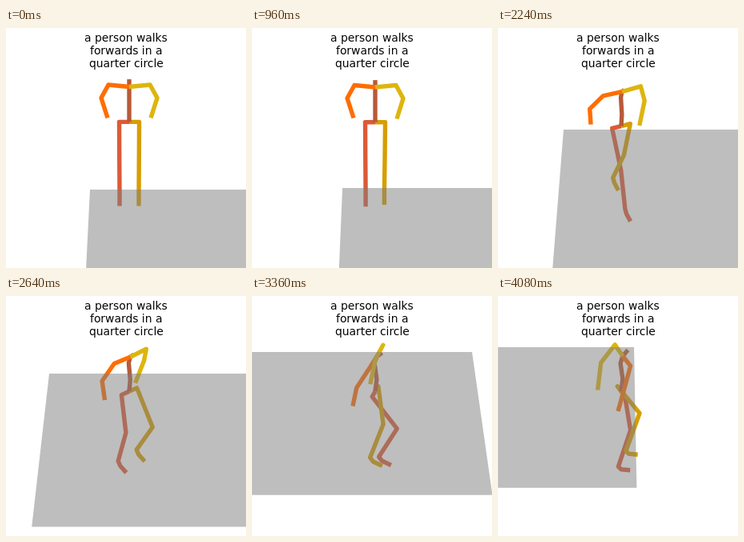
Recreate the animation shown at these times as an HTML page with a canvas. Size 300x300 px, loop 4160 ms.

```html
<!DOCTYPE html>
<html lang="en">
<head>
<meta charset="utf-8">
<title>Walking figure</title>
<style>
html, body { margin: 0; width: 100%; height: 100%; overflow: hidden; background: #fff; }
canvas { display: block; }
</style>
</head>
<body>
<canvas id="stage" width="300" height="300"></canvas>
<script>
const ctx = document.getElementById('stage').getContext('2d');
const LOOP = 4160, STEP = 80;
const TITLE = ['a person walks', 'forwards in a', 'quarter circle'];
const LEFT = 1, RIGHT = -1;

// Ground: a square seen in perspective; scale grows linearly below the horizon.
const CENTER = 154, HORIZON = -780, WIDTH = 0.356, DEPTH = 0.0002043;

// Body, in pixels: camera tilt, floor line at ankle height, limb sizes.
const TILT_Z = 0.55, TILT_H = 0.86, FLOOR = 206;
const BONE = 52, REACH = 103, HIP = 12.5, SHOULDER = 26;
const CYCLE = 1440, CONTACT = 1514, STRIDE = 42;

// Walked path: time, left edge of the ground, screen y of its far edge.
const path = [
  [0, -0.0499, 202],
  [960, -0.0418, 200],
  [1600, -0.0374, 182],
  [2240, -0.0794, 127],
  [2640, -0.114, 97],
  [3360, -0.2136, 70],
  [4080, -0.337, 64]
];

const ramp = (t, from, span) => Math.min(1, Math.max(0, (t - from) / span));

// Smooth interpolation that does not overshoot at turning points.
function along(t, c) {
  const last = path.length - 1;
  const slope = k => (path[k + 1][c] - path[k][c]) / (path[k + 1][0] - path[k][0]);
  const tangent = k => {
    if (k === 0) return slope(0);
    if (k === last) return slope(last - 1);
    const a = slope(k - 1), b = slope(k);
    return a * b <= 0 ? 0 : 2 * a * b / (a + b);
  };
  let i = 0;
  while (i < last - 1 && t >= path[i + 1][0]) i++;
  const span = path[i + 1][0] - path[i][0], u = ramp(t, path[i][0], span);
  const p = path[i][c], d = path[i + 1][c] - p;
  const m = tangent(i) * span, n = tangent(i + 1) * span;
  return p + u * (m + u * (3 * d - 2 * m - n + u * (m + n - 2 * d)));
}

// Everything the pose needs at one moment.
function gait(t) {
  const walk = ramp(t, 900, 700);
  const turn = Math.pow(ramp(t, 1000, 3080), 1.65);
  const phase = 2 * Math.PI * (t - CONTACT) / CYCLE;
  const reach = Math.cos(phase);
  return {
    walk, turn, phase,
    facing: turn * 112 * Math.PI / 180,
    stride: STRIDE * ramp(t, 900, 1600),
    hips: 103 - walk * (2 + 4 * reach * reach)
  };
}

// Points are [forward, left, up] relative to the spot below the pelvis.
const add = (a, b) => a.map((v, i) => v + b[i]);

function leg(side, g) {
  const swing = side * Math.cos(g.phase), speed = -side * Math.sin(g.phase);
  const hip = [0, side * HIP, g.hips];
  const lift = g.walk * 24 * (1 - 0.6 * g.turn) * Math.max(0, speed) ** 2;
  let df = g.stride * swing, dh = lift - g.hips;
  const far = Math.hypot(df, dh), dist = Math.min(far, REACH);
  df *= dist / far;
  dh *= dist / far;
  const bend = Math.sqrt(BONE * BONE - dist * dist / 4);
  const ankleSide = side * (12 - 4 * g.walk) - 3 * g.walk;
  const ankle = [df, ankleSide, g.hips + dh];
  const knee = [
    df / 2 - bend * dh / dist,
    (hip[1] + ankleSide) / 2,
    g.hips + dh / 2 + bend * df / dist
  ];
  return [[0, 0, g.hips], hip, knee, ankle, add(ankle, [4, 0, -5]), add(ankle, [16, 0, -9])];
}

function torso(g) {
  const pelvis = [0, 0, g.hips];
  const neck = add(pelvis, [2 * g.walk, 0, 51]);
  return [
    pelvis,
    add(pelvis, [2, 0, 18]),
    add(pelvis, [-1, 0, 41]),
    neck,
    add(neck, [7 * g.walk, 0, 11 - 4 * g.walk])
  ];
}

function arm(side, neck, g) {
  const swing = -side * Math.cos(g.phase) * g.walk;
  const shoulder = add(neck, [0, side * SHOULDER, 3 - 2 * g.walk]);
  const elbow = add(shoulder, [-14 + 6 * swing, side * 9, -28]);
  const wrist = add(elbow, [-6 + 8 * swing, -side * 8, -33]);
  return [neck, shoulder, elbow, wrist];
}

function chain(color, points, facing) {
  const sin = Math.sin(facing), cos = Math.cos(facing);
  ctx.strokeStyle = color;
  ctx.beginPath();
  for (const [f, l, h] of points) {
    const x = f * sin + l * cos, z = f * cos - l * sin;
    ctx.lineTo(CENTER + x, FLOOR + z * TILT_Z - h * TILT_H);
  }
  ctx.stroke();
}

function drawBody(t) {
  const g = gait(t), spine = torso(g), neck = spine[3];
  ctx.lineWidth = 5.4;
  ctx.lineJoin = 'round';
  chain('#dd5a37', leg(RIGHT, g), g.facing);
  chain('#d69e00', leg(LEFT, g), g.facing);
  chain('#b75a39', spine, g.facing);
  chain('#ff6d00', arm(RIGHT, neck, g), g.facing);
  chain('#ddb50e', arm(LEFT, neck, g), g.facing);
}

function drawGround(t) {
  const left = along(t, 1), right = left + WIDTH;
  const far = along(t, 2) - HORIZON;
  const near = 1 / (1 / far - DEPTH);
  ctx.fillStyle = 'rgba(127, 127, 127, 0.5)';
  ctx.beginPath();
  for (const [x, s] of [[left, far], [right, far], [right, near], [left, near]]) {
    ctx.lineTo(CENTER + x * s, HORIZON + s);
  }
  ctx.fill();
}

function drawTitle() {
  ctx.fillStyle = '#000';
  ctx.font = '13.89px "DejaVu Sans", sans-serif';
  TITLE.forEach((line, i) => {
    const x = Math.round(150 - ctx.measureText(line).width / 2);
    ctx.fillText(line, x, 17 + 16 * i);
  });
}

function draw(t) {
  ctx.fillStyle = '#fff';
  ctx.fillRect(0, 0, 300, 300);
  drawBody(t);
  drawGround(t);
  drawTitle();
}

const start = performance.now();
function tick() {
  const t = Math.max(0, performance.now() - start) % LOOP;
  draw(Math.floor(t / STEP) * STEP);
  requestAnimationFrame(tick);
}
tick();
</script>
</body>
</html>
```
